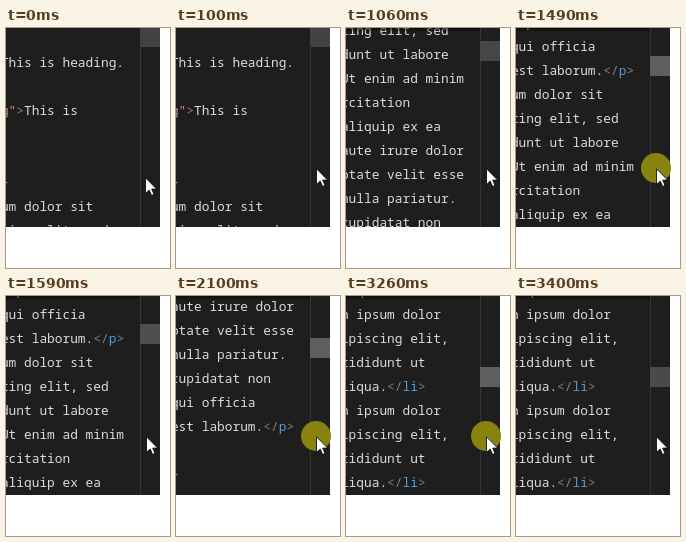
Recreate the animation shown at these times as an HTML page. Size 164 by 240 pixels, loop 4600 ms.

```html
<!DOCTYPE html>
<html lang="en">
<head>
<meta charset="utf-8">
<title>Scrolling by clicking the scrollbar</title>
<style>
  html, body { margin: 0; width: 100%; height: 100%; overflow: hidden; background: #fff; }
  .stage { position: relative; width: 164px; height: 240px; overflow: hidden; }
  .editor { position: absolute; width: 154px; height: 199px; overflow: hidden; background: #1e1e1e; }
  .editor > *, .halo, .pointer { position: absolute; animation: 4600ms step-end infinite; }

  .code {
    left: -5.1px; top: 22px; margin: 0; color: #dcdcdc;
    font: 12.83px/24px "Noto Sans Mono", "DejaVu Sans Mono", monospace;
    font-variant-ligatures: none;
    animation-name: scroll;
  }
  .code b { font-weight: normal; color: #808080; }
  .code i { font-style: normal; color: #569cd6; }
  .code u { text-decoration: none; color: #ce9178; }

  .shadow { width: 134px; height: 4px; background: linear-gradient(#0009, #0000); animation-name: shade; }
  .ruler { left: 134px; width: 1px; height: 199px; background: #353535; }
  .thumb { left: 134px; top: 0; width: 20px; height: 20px; background: #424242; animation-name: slide, tint; }
  .halo { left: 125px; top: 125px; width: 30px; height: 30px; border-radius: 50%; background: #88830f; animation-name: press; }
  .pointer { left: 140px; top: 140px; width: 12px; height: 19px; overflow: visible; animation-name: arrive; }

  @keyframes scroll {
    0% { transform: none; }
    20.652% { transform: translateY(-200px); }
    32.391% { transform: translateY(-400px); }
    45.652% { transform: translateY(-600px); }
    57.608% { transform: translateY(-800px); }
    70.869%, 100% { transform: translateY(-1000px); }
  }
  @keyframes slide {
    0% { transform: translateY(-1px); }
    20.652% { transform: translateY(13px); }
    32.391% { transform: translateY(28px); }
    45.652% { transform: translateY(42px); }
    57.608% { transform: translateY(57px); }
    70.869%, 100% { transform: translateY(71px); }
  }
  @keyframes tint {
    0% { background: #424242; }
    20.652% { background: #5e5e5e; }
    23.043% { background: #464646; }
    32.391% { background: #5e5e5e; }
    34.565% { background: #4f4f4f; }
    45.652% { background: #5e5e5e; }
    47.173% { background: #4f4f4f; }
    57.608% { background: #5e5e5e; }
    60.434% { background: #4f4f4f; }
    70.869% { background: #5e5e5e; }
    73.913%, 100% { background: #4a4a4a; }
  }
  @keyframes press {
    0%, 23.043%, 34.565%, 47.173%, 60.434%, 73.913%, 100% { opacity: 0; }
    20%, 32.391%, 45.652%, 57.608%, 70.869% { opacity: 1; }
  }
  @keyframes shade {
    0% { opacity: 0; }
    20.652%, 100% { opacity: 1; }
  }
  @keyframes arrive {
    0% { transform: translate(-1px, 9px); }
    .652% { transform: translate(0, 4px); }
    2.173%, 100% { transform: none; }
  }
</style>
</head>
<body>
<div class="stage">
  <div class="editor">
    <pre class="code"></pre>
    <div class="shadow"></div>
    <div class="ruler"></div>
    <div class="thumb"></div>
  </div>
  <div class="halo"></div>
  <svg class="pointer" viewBox="0 0 12 19">
    <path d="M.5 .8V16.5L4.2 13L6.6 18.4L9 17.4L6.7 12.1H11.6Z" fill="#fff" stroke="#000" stroke-width=".8"/>
  </svg>
</div>
<script>
  const closeTag = name => `<b>&lt;/</b><i>${name}</i><b>&gt;</b>`;

  const paragraph = [
    'um dolor sit', 'ting elit, sed', 'dunt ut labore', 'Ut enim ad minim',
    'rcitation', 'aliquip ex ea', 'aute irure dolor', 'otate velit esse',
    'nulla pariatur.', 'cupidatat non', 'qui officia', 'est laborum.' + closeTag('p'),
  ];
  const item = ['n ipsum dolor', 'ipiscing elit,', 'tididunt ut', 'liqua.' + closeTag('li')];
  const bracket = '<b>&gt;</b>';

  document.querySelector('.code').innerHTML = [
    'This is heading.', '', `<u>g"</u>${bracket}This is`, '', '', bracket,
    ...paragraph, ...paragraph, '', bracket, '',
    ...Array(4).fill(item).flat(),
  ].join('\n');
</script>
</body>
</html>
```
